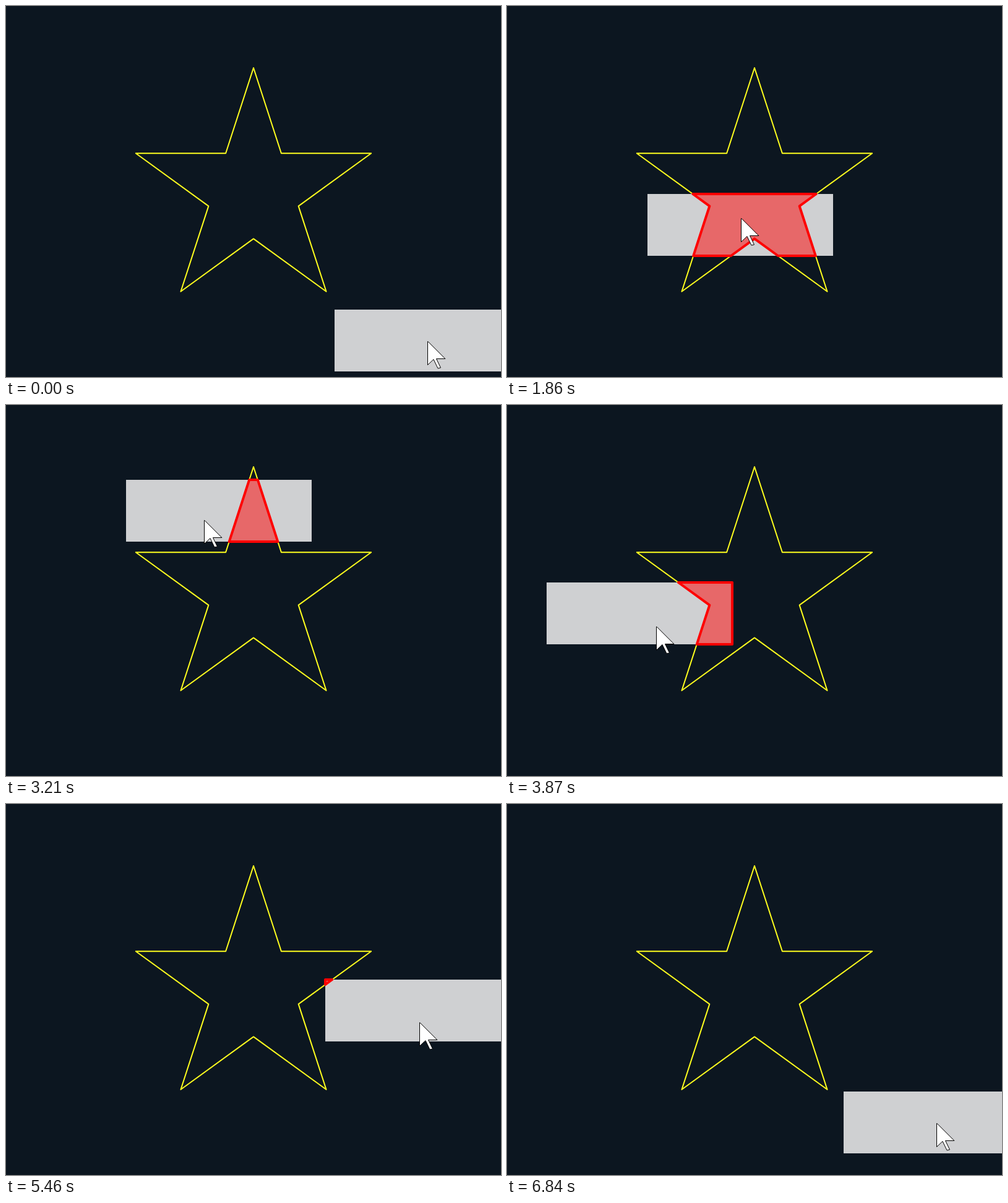
Recreate the animation shown at these times as an HTML page with a canvas. Size 800x600 px, loop 7050 ms.

```html
<!DOCTYPE html>
<html lang="en">
<head>
<meta charset="utf-8">
<title>Star and rectangle intersection</title>
<style>
  html, body { margin: 0; width: 100%; height: 100%; overflow: hidden; background: #0c1620; }
  canvas { display: block; }
</style>
</head>
<body>
<canvas id="stage" width="800" height="600"></canvas>
<script>
const ctx = document.getElementById('stage').getContext('2d');
const LOOP = 7050, STEP = 30, POINTER_LEAD = 75;
const WIDTH = 300, HEIGHT = 100;

// Rectangle drag: time, left, top
const keys = [
  [315, 531, 491], [480, 490, 480], [640, 410, 454], [800, 340, 432],
  [960, 295, 420], [990, 289, 419], [1065, 275, 415], [1300, 245, 388],
  [1500, 231, 360], [1680, 225, 333], [1860, 227, 304], [1935, 228, 292],
  [2160, 233, 250], [2400, 239, 207], [2700, 241, 147], [2940, 241, 105],
  [3040, 239, 99], [3120, 226, 104], [3210, 194, 121], [3285, 170, 135],
  [3440, 110, 166], [3600, 60, 210], [3750, 43, 250], [3880, 67, 290],
  [4000, 115, 318], [4200, 207, 330], [4380, 285, 330], [4560, 357, 311],
  [4590, 365, 305], [4665, 384, 291], [4800, 413, 246], [4920, 428, 190],
  [5010, 435, 160], [5060, 440, 155], [5150, 451, 169], [5280, 478, 222],
  [5400, 508, 268], [5460, 516, 284], [5535, 518, 302], [5700, 526, 358],
  [5850, 535, 418], [6000, 543, 460], [6090, 544, 465]
];

function slope(i, axis) {
  if (i === 0 || i === keys.length - 1) return 0;
  const [a, b, c] = [keys[i - 1], keys[i], keys[i + 1]];
  const before = b[0] - a[0], after = c[0] - b[0];
  return ((b[axis] - a[axis]) / before * after + (c[axis] - b[axis]) / after * before) / (before + after);
}

// Cubic Hermite interpolation, rounded to whole pixels
function positionAt(time) {
  if (time <= keys[0][0]) return keys[0].slice(1);
  const next = keys.findIndex(key => key[0] > time);
  if (next < 0) return keys[keys.length - 1].slice(1);
  const a = keys[next - 1], b = keys[next], span = b[0] - a[0];
  const u = (time - a[0]) / span, v = 1 - u;
  return [1, 2].map(axis => Math.round(
    a[axis] * (1 + 2 * u) * v * v + b[axis] * u * u * (3 - 2 * u) +
    span * u * v * (slope(next - 1, axis) * v - slope(next, axis) * u)));
}

function polygonPath(points) {
  const path = new Path2D();
  points.forEach(p => path.lineTo(...p));
  path.closePath();
  return path;
}

const edgesOf = points => points.map((p, i) => [p, points[(i + 1) % points.length]]);
const between = ([a, b], u) => [a[0] + (b[0] - a[0]) * u, a[1] + (b[1] - a[1]) * u];

const star = Array.from({ length: 10 }, (_, i) => {
  const angle = i * Math.PI / 5, radius = i % 2 ? 76.4 : 200;
  return [400 + radius * Math.sin(angle), 300 - radius * Math.cos(angle)];
});
const starPath = polygonPath(star);
const pointerPath = polygonPath([
  [0.5, 0.5], [0.5, 38.5], [10, 29.5], [17, 44], [21.5, 43], [14.5, 28.5], [28.5, 28.5]
]);

// Parameter along the first segment where the second crosses it
function crossing([a, b], [c, d]) {
  const rx = b[0] - a[0], ry = b[1] - a[1], sx = d[0] - c[0], sy = d[1] - c[1];
  const det = rx * sy - ry * sx;
  if (Math.abs(det) < 1e-9) return -1;
  const qx = c[0] - a[0], qy = c[1] - a[1];
  const u = (qx * sy - qy * sx) / det, v = (qx * ry - qy * rx) / det;
  return v >= 0 && v <= 1 ? u : -1;
}

// Adds to the outline the parts of one polygon's edges that lie inside another
function addInnerEdges(outline, points, others, othersPath) {
  for (const edge of edgesOf(points)) {
    const cuts = edgesOf(others).map(other => crossing(edge, other)).filter(u => u > 0 && u < 1);
    const stops = [0, ...cuts, 1].sort((a, b) => a - b);
    for (let i = 1; i < stops.length; i++) {
      const middle = between(edge, (stops[i - 1] + stops[i]) / 2);
      if (!ctx.isPointInPath(othersPath, ...middle)) continue;
      outline.moveTo(...between(edge, stops[i - 1]));
      outline.lineTo(...between(edge, stops[i]));
    }
  }
}

function stroke(path, color, width) {
  ctx.strokeStyle = color;
  ctx.lineWidth = width;
  ctx.stroke(path);
}

function draw(time) {
  const [x, y] = positionAt(time);
  const [px, py] = positionAt(time + POINTER_LEAD);
  const box = [[x, y], [x + WIDTH, y], [x + WIDTH, y + HEIGHT], [x, y + HEIGHT]];

  ctx.fillStyle = '#0c1620';
  ctx.fillRect(0, 0, 800, 600);
  ctx.lineJoin = ctx.lineCap = 'round';
  stroke(starPath, '#ffff1e', 2);

  ctx.fillStyle = '#cfd0d2';
  ctx.fillRect(x, y, WIDTH, HEIGHT);

  ctx.save();
  ctx.clip(starPath);
  ctx.fillStyle = '#e76869';
  ctx.fillRect(x, y, WIDTH, HEIGHT);
  ctx.restore();

  const outline = new Path2D();
  addInnerEdges(outline, star, box, polygonPath(box));
  addInnerEdges(outline, box, star, starPath);
  stroke(outline, '#ff0000', 4);

  ctx.save();
  ctx.translate(px + 150, py + 51);
  ctx.lineJoin = 'miter';
  ctx.fillStyle = '#fff';
  ctx.fill(pointerPath);
  stroke(pointerPath, '#000', 1);
  ctx.restore();
}

const start = performance.now();
function tick() {
  const time = (performance.now() - start) % LOOP;
  draw(Math.floor(time / STEP) * STEP);
  requestAnimationFrame(tick);
}
tick();
</script>
</body>
</html>
```
